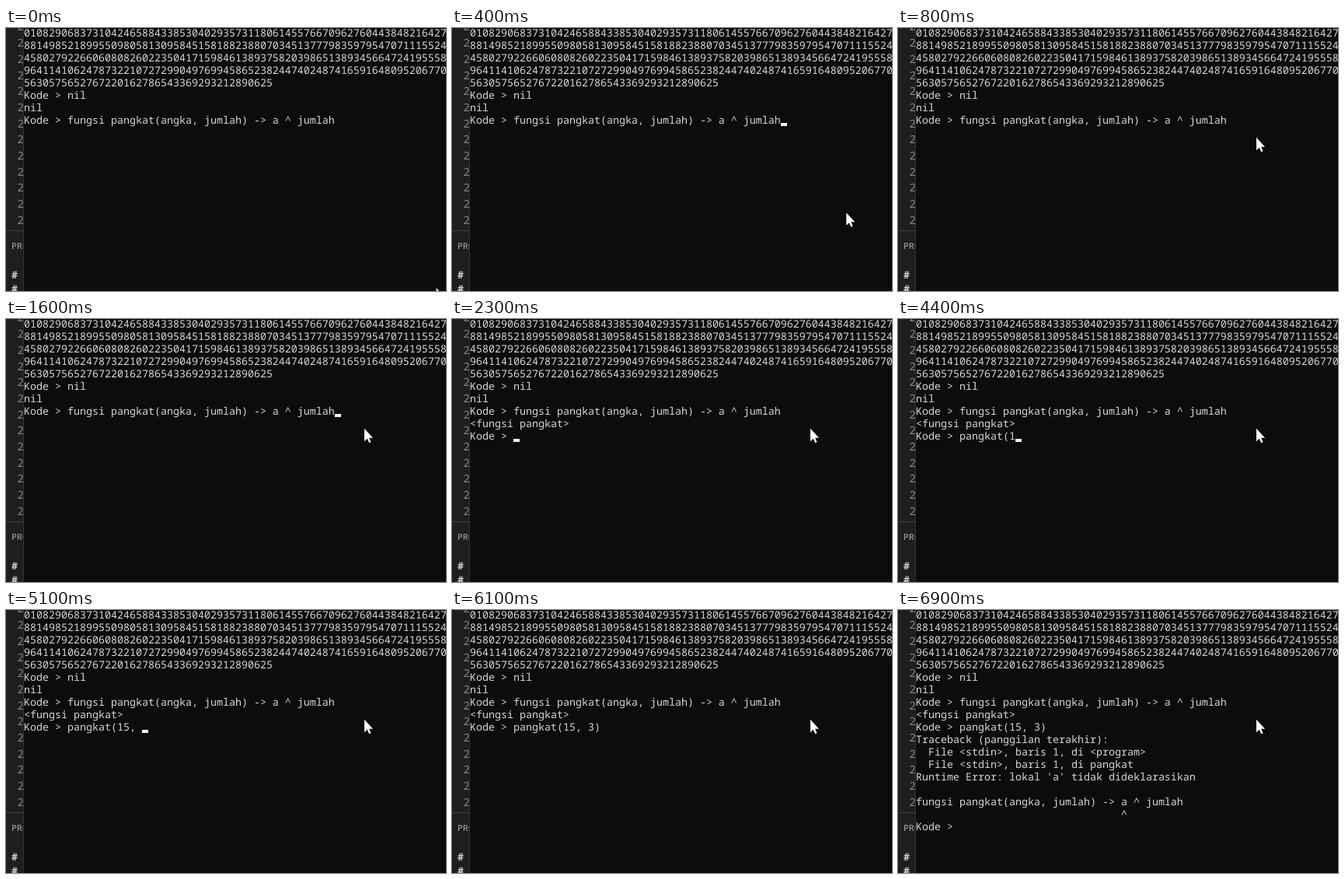
Recreate the animation shown at these times as an HTML page. Size 566x338 px, loop 7.1 s.

```html
<!DOCTYPE html>
<html lang="id">
<head>
<meta charset="utf-8">
<title>Terminal</title>
<style>
  html, body { margin: 0; width: 100%; height: 100%; overflow: hidden; background: #0c0c0c; }
  svg { display: block; width: 566px; height: 338px; }
  text { white-space: pre; text-rendering: geometricPrecision; }
  .mono { font: 13.333px "Noto Sans Mono", "DejaVu Sans Mono", monospace; fill: #d6d6d6; }
  .gutter { font-size: 14px; fill: #858585; }
  .shell { font-weight: 600; fill: #d6d6d6; }
  .tab { font: 600 11px "Open Sans", "Noto Sans", sans-serif; fill: #969696; }
</style>
</head>
<body>
<svg id="stage" viewBox="0 0 566 338">
  <rect width="566" height="338" fill="#1e1e1e"/>
  <g id="editor"></g>
  <rect x="22" width="544" height="338" fill="#0c0c0c"/>
  <rect x="22" width="1" height="338" fill="#343434"/>
  <g id="console"></g>
  <rect id="caret" width="8" height="4" fill="#f2f2f2"/>
  <path id="mouse" d="M0 0V16.4L3.7 12.9 6.2 18.4 8.5 17.4 6.1 11.9H11Z" fill="#fff"/>
</svg>
<script>
const LOOP = 7100, LEFT = 23, CELL = 8, LINE = 16;
const $ = id => document.getElementById(id);

function make(parent, tag, attrs, content = "") {
  const el = document.createElementNS("http://www.w3.org/2000/svg", tag);
  for (const key in attrs) el.setAttribute(key, attrs[key]);
  el.textContent = content;
  parent.append(el);
  return el;
}

// Strip of the editor left of the console
const editor = $("editor");
for (let i = 0; i < 13; i++)
  make(editor, "text", { class: "mono gutter", x: 14.6, y: 3.4 + 20.7 * i }, "2");
make(editor, "rect", { y: 260, width: 23, height: 1, fill: "#414141" });
make(editor, "text", { class: "tab", x: 7, y: 284 }, "PROBLEMS");
for (const y of [322, 340])
  make(editor, "text", { class: "mono shell", x: 7, y }, "#");

const PROMPT = "Kode > ";
const BODY = "fungsi pangkat(angka, jumlah) -> a ^ jumlah";
const CALL = "pangkat(15, 3)";
const history = [
  "01082906837310424658843385304029357311806145576670962760443848216427",
  "88149852189955098058130958451581882388070345137779835979547071115524",
  "45802792266060808260223504171598461389375820398651389345664724195558",
  "96411410624787322107272990497699458652382447402487416591648095206770",
  "5630575652767220162786543369293212890625",
  PROMPT + "nil",
  "nil",
  PROMPT + BODY
];
const failure = [
  "Traceback (panggilan terakhir):",
  "  File <stdin>, baris 1, di <program>",
  "  File <stdin>, baris 1, di pangkat",
  "Runtime Error: lokal 'a' tidak dideklarasikan",
  "",
  BODY,
  " ".repeat(BODY.indexOf("a ^")) + "^",
  PROMPT
];

const ENTER = 2000, RUN = 6200;
// [time, characters typed]
const typing = [[2700, 1], [3300, 2], [3400, 3], [3500, 5], [3600, 6], [3700, 7],
  [4400, 9], [4700, 10], [4900, 11], [5100, 12], [5300, 13], [5600, 14]];
// Spans in which the caret is lit
const lit = [[300, 800], [1300, 1800], [2000, 2400], [3000, 3600],
  [4100, 4600], [5100, 5700], [6200, 6700]];

const rows = Array.from({ length: 18 }, (_, i) =>
  make($("console"), "text", { class: "mono", x: LEFT, y: 11 + LINE * i }));

function linesAt(t) {
  if (t < ENTER) return history;
  const count = typing.reduce((n, [at, typed]) => t >= at ? typed : n, 0);
  const lines = [...history, "<fungsi pangkat>", PROMPT + CALL.slice(0, count)];
  return t < RUN ? lines : lines.concat(failure);
}

function draw(time) {
  const t = Math.floor(time % LOOP / 100) * 100;
  const lines = linesAt(t);
  rows.forEach((row, i) => {
    const content = lines[i] || "";
    if (row.textContent !== content) row.textContent = content;
  });

  const last = lines.length - 1;
  const caret = $("caret");
  caret.setAttribute("x", LEFT + CELL * lines[last].length);
  caret.setAttribute("y", 10 + LINE * last);
  caret.setAttribute("visibility", lit.some(([a, b]) => t >= a && t < b) ? "visible" : "hidden");

  const p = Math.min(t / 800, 1);
  const ease = p * p * (3 - 2 * p);
  const x = 553.5 - 92.5 * ease, y = 334 - 193.2 * ease;
  $("mouse").setAttribute("transform", `translate(${x} ${y})`);
}

const start = performance.now();
function tick() {
  draw(performance.now() - start);
  requestAnimationFrame(tick);
}
tick();
</script>
</body>
</html>
```
